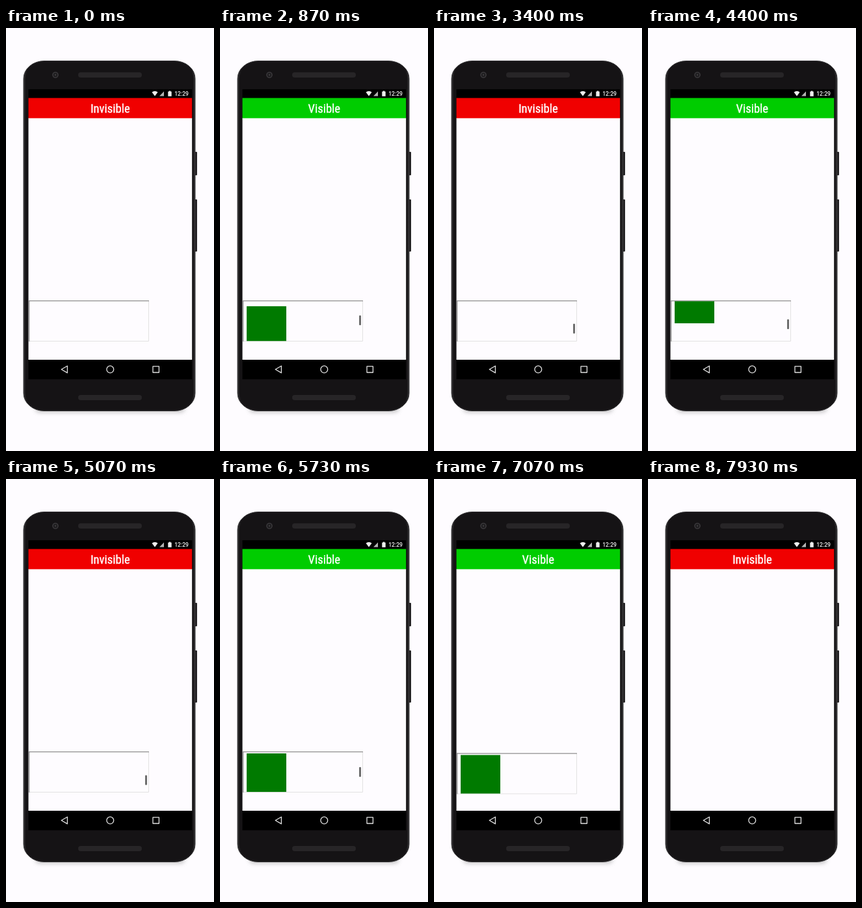
Write an HTML page that moves like this. It is 320 px wide and 649 px high and loops after 8 s.

```html
<!DOCTYPE html>
<html lang="en">
<head>
<meta charset="utf-8">
<title>Visibility demo</title>
<style>
  html, body { margin: 0; width: 100%; height: 100%; overflow: hidden; background: #fefcff; }
  svg { display: block; width: 100%; height: 100%; }
  #title { font: 18.6px "Roboto Condensed", Roboto, sans-serif; font-stretch: condensed; }
  #clock { font: 500 8.6px Roboto, sans-serif; }
</style>
</head>
<body>
<svg viewBox="0 0 320 649">
  <defs>
    <clipPath id="pageClip"><rect x="34.5" y="138" width="251.7" height="371"/></clipPath>
    <clipPath id="frameClip"><rect x="36" y="419.3" width="183" height="61"/></clipPath>
    <filter id="soft" x="-10%" y="-100%" width="120%" height="300%"><feGaussianBlur stdDeviation="3"/></filter>
    <linearGradient id="edge">
      <stop offset="0" stop-color="#343335"/>
      <stop offset=".02" stop-color="#171517"/>
      <stop offset=".98" stop-color="#171517"/>
      <stop offset="1" stop-color="#343335"/>
    </linearGradient>
  </defs>

  <rect x="45" y="578" width="230" height="12" rx="6" fill="#777" opacity=".4" filter="url(#soft)"/>
  <g fill="#242325">
    <rect x="289" y="190" width="5" height="36" rx="1"/>
    <rect x="289" y="263" width="5" height="80" rx="1"/>
  </g>
  <rect x="27" y="50.5" width="264" height="537" rx="32" ry="27" fill="url(#edge)" stroke="#343335"/>
  <rect x="29.5" y="53" width="259" height="532" rx="30" ry="25" fill="#151315"/>
  <g fill="#272527">
    <rect x="111" y="68" width="98" height="8" rx="4"/>
    <rect x="111" y="563" width="98" height="8" rx="4"/>
  </g>
  <circle cx="76" cy="72" r="4" fill="#1c1b1d" stroke="#3b393c" stroke-width="1.6"/>
  <circle cx="76" cy="72" r="1.4" fill="#3b393c"/>

  <rect x="34.5" y="94" width="251.7" height="445" fill="#000"/>
  <g fill="#eee">
    <path d="M224.5 98.4Q229 95.2 233.5 98.4L229 104.5Z"/>
    <path d="M236 104.5L243 97.3V104.5Z" opacity=".75"/>
    <path d="M249.3 97.5h1.5v-1h2.4v1h1.5v7.2h-5.4Z"/>
    <text id="clock" x="259.2" y="104.1">12:29</text>
  </g>
  <rect x="34.5" y="138" width="251.7" height="371" fill="#fefcff"/>
  <rect id="bar" x="34.5" y="107.4" width="251.7" height="31"/>
  <text id="title" x="160.3" y="129.5" fill="#fff" stroke="#fff" stroke-width=".35" text-anchor="middle"></text>

  <g clip-path="url(#pageClip)">
    <g id="frame">
      <path d="M219.5 418.5V480.5H36" fill="none" stroke="#e2e2e2"/>
      <path d="M35 418.6H220" stroke="#8e8e8e" stroke-width="1.3"/>
      <path d="M35.7 418V481" stroke="#8e8e8e" stroke-width="1.2"/>
      <g clip-path="url(#frameClip)">
        <rect id="box" x="41" y="421" width="61" height="59.3" fill="#007a00"/>
        <rect id="thumb" x="214" width="3" height="15" rx="1" fill="#6e6e6e"/>
      </g>
    </g>
  </g>

  <g fill="none" stroke="#e4e4e4" stroke-width="1.3" stroke-linejoin="round">
    <path d="M85.2 523.8L94.4 518.5V529.1Z"/>
    <circle cx="160.3" cy="523.8" r="5.4"/>
    <rect x="226" y="519.1" width="9.4" height="9.4"/>
  </g>
</svg>
<script>
const LOOP = 8000, FPS = 15;
const ENTER = 121, HIDE = 70, LEAVE = 105, NUDGE = 40;
const el = id => document.getElementById(id);

// Smooth 0 to 1 between two times
function ease(t, from, to) {
  const p = Math.min(1, Math.max(0, (t - from) / (to - from)));
  return p * p * (3 - 2 * p);
}

// Rises to 1, holds, falls back to 0
const hump = (t, up, top, down, end) => ease(t, up, top) - ease(t, down, end);

function draw(now) {
  const step = Math.floor((now % LOOP + 4) * FPS / 1000);
  const t = step * 1000 / FPS % LOOP;

  const inner = ENTER * (1 - ease(t, 0, 1000))
    - HIDE * (hump(t, 1870, 3000, 3270, 4000) + hump(t, 4200, 4670, 5000, 5700));
  const page = NUDGE * hump(t, 6200, 6600, 6600, 7000) + LEAVE * ease(t, 7025, 7480);
  const touch = hump(t, 0, 70, 930, 1070) + hump(t, 1800, 1870, 5800, 5930);
  const visible = inner < 60 && inner > -61 && page < 88;

  el("frame").setAttribute("transform", `translate(0 ${page})`);
  el("box").setAttribute("y", 421 + inner);
  el("thumb").setAttribute("y", 442 - inner * 0.185);
  el("thumb").setAttribute("opacity", touch);
  el("bar").setAttribute("fill", visible ? "#00cc00" : "#f00000");
  el("title").textContent = visible ? "Visible" : "Invisible";
}

const start = performance.now();
function tick() {
  draw(performance.now() - start);
  requestAnimationFrame(tick);
}
tick();
</script>
</body>
</html>
```
